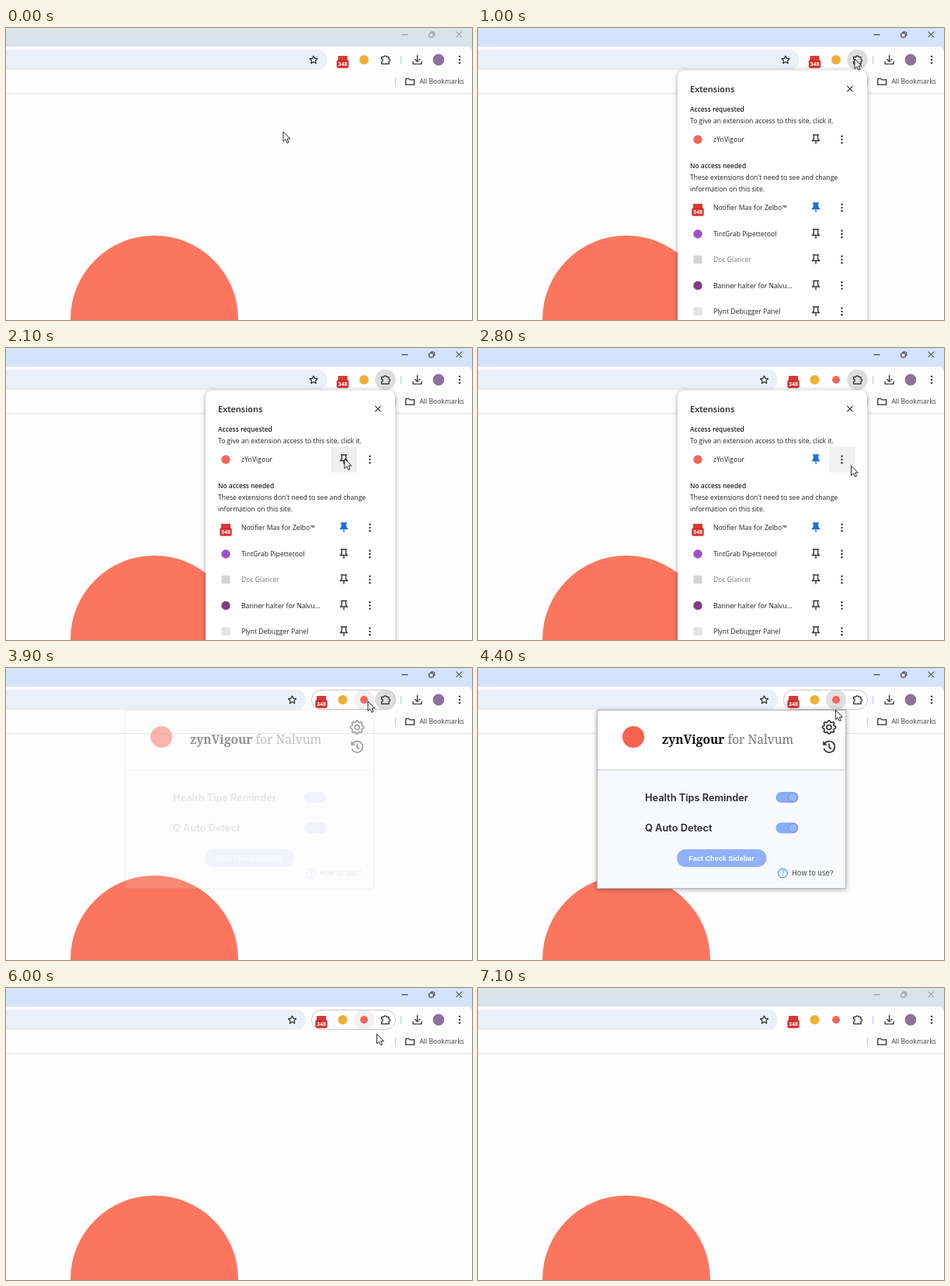
Write an HTML page that moves like this. It is 600 px wide and 377 px high and loops after 7200 ms.

```html
<!DOCTYPE html>
<html lang="en">
<head>
<meta charset="utf-8">
<title>Browser extension walkthrough</title>
<style>
  html, body { margin: 0; height: 100%; overflow: hidden; background: #fefdfd; }
  svg { display: block; width: 100vw; height: 100vh; }
  text { font: 8.65px "Open Sans", "Noto Sans", sans-serif; fill: #1f1f1f; }
  .semi { font-size: 8.35px; font-weight: 600; }
  .heading { font-size: 11px; font-weight: 600; }
  .badge { font: bold 7px "Open Sans", sans-serif; fill: #fff; text-anchor: middle; }
  .title { font: 15.5px "Noto Serif", serif; fill: #777; }
  .title tspan { font-weight: 700; fill: #111; }
  .option { font: 600 12.8px Inter, sans-serif; fill: #292929; }
  .button { font: bold 9.1px "Liberation Sans", Arial, sans-serif; fill: #fff; text-anchor: middle; }
  .help { font: 9.2px Inter, sans-serif; fill: #4a4a4a; }
  .line { fill: none; stroke: #2b2b2b; stroke-width: 1.2; }
  .panel { filter: drop-shadow(0 1px 3px #0005); }
</style>
</head>
<body>
<svg viewBox="0 0 600 377">
  <defs>
    <g id="dots" fill="#333"><circle cy="-4.3" r="1.2"/><circle r="1.2"/><circle cy="4.3" r="1.2"/></g>
    <path id="pin" d="M-4-6H4M-2.6-6V-1L-4.4 1.5H4.4L2.6-1V-6M0 1.5V6" stroke-width="1.3"/>
    <path id="cross" d="M-3.7-3.7L3.7 3.7M3.7-3.7L-3.7 3.7"/>
    <g id="mail">
      <rect x="-6" y="-5" width="12" height="12" fill="#d93a35"/>
      <rect x="-7.7" y="0" width="15.4" height="10.7" rx="2.5" fill="#d32f2f"/>
      <text class="badge" y="8.2">348</text>
    </g>
    <g id="toggle">
      <rect x="-14.5" y="-7" width="29" height="14" rx="7" fill="#8cabf9"/>
      <circle cx="7.2" r="5.7" fill="#9ab6fb" stroke="#7592dc"/>
    </g>
  </defs>

  <rect id="titleBar" width="600" height="40"/>
  <path d="M0 24H593Q600 24 600 31V377H0Z" fill="#fefdfd"/>
  <g id="windowButtons" fill="none">
    <path d="M509.5 8.7H517.5"/>
    <rect x="544.8" y="6.6" width="5.4" height="5.4" rx="1"/>
    <path d="M546.6 5H550Q551.8 5 551.8 6.8V10.2"/>
    <use href="#cross" x="583.3" y="8.3"/>
  </g>
  <path d="M0 84.5H600" stroke="#e3e4e7"/>
  <circle cx="191" cy="376" r="108" fill="#fc765f"/>

  <rect id="addressBar" x="-20" y="28" height="26" rx="13" fill="#ebeff8"/>
  <g id="shifted">
    <path class="line" stroke-linejoin="round" d="M396 36L397.5 39.3 401 39.7 398.4 42.1 399.2 45.7 396 43.8 392.8 45.7 393.6 42.1 391 39.7 394.5 39.3Z"/>
    <use href="#mail" x="433.5" y="41"/>
    <circle cx="461" cy="41" r="6" fill="#f0ae35"/>
  </g>
  <circle id="puzzleGlow" cx="488.5" cy="41" r="13.3" fill="#dcdcdc"/>
  <circle id="healthGlow" cx="461" cy="41" r="13"/>
  <circle id="healthIcon" cx="461" cy="41" r="5" fill="#f4655a"/>
  <rect id="pill" x="393.5" y="28.5" width="108" height="25" rx="12.5" fill="none" stroke="#cfc4c6"/>
  <path class="line" stroke-linejoin="round" d="M483.6 37.3H486.8A1.5 1.5 0 0 1 489.8 37.3H493V40.3A1.5 1.5 0 0 1 493 43.3V46.4H483.6V43.4A1.6 1.6 0 0 0 483.6 40.2Z"/>
  <path d="M508.5 36V47M501.5 64V75" stroke="#c3d6f6" stroke-width="1.5"/>
  <path class="line" stroke-width="1.5" d="M529.5 35V43M526 39.8L529.5 43.3 533 39.8M524 43V46.5H535V43"/>
  <circle cx="557" cy="41" r="7.5" fill="#8e7199"/>
  <use href="#dots" x="584" y="41"/>
  <path class="line" stroke-linejoin="round" d="M514.7 65.3H518.5L520 66.8H525.5V73.2H514.7Z"/>
  <text x="532.4" y="72.2" style="fill:#3c3c3c">All Bookmarks</text>

  <g id="menu">
    <rect class="panel" x="257" y="54.5" width="244" height="345" rx="9" fill="#fff"/>
    <text class="heading" x="273" y="83">Extensions</text>
    <use href="#cross" x="479" y="78.5" stroke="#333" stroke-width="1.2"/>
    <text class="semi" x="273" y="108">Access requested</text>
    <text x="273" y="123">To give an extension access to this site, click it.</text>
    <text class="semi" x="273" y="181">No access needed</text>
    <text x="273" y="196">These extensions don't need to see and change</text>
    <text x="273" y="211">information on this site.</text>
    <rect id="rowHover" y="127.5" width="33.5" height="33" fill="#f0f0f0"/>
    <g id="rows"></g>
  </g>

  <g id="popup">
    <g id="popupPanel">
      <rect class="panel" x="153.5" y="54.5" width="320" height="230" fill="#fff" stroke="#b5b9c0"/>
      <rect x="154" y="132" width="319" height="152" fill="#f8faff"/>
      <path d="M154 131.5H473" stroke="#c8cacc"/>
    </g>
    <g id="popupHeader">
      <circle cx="200" cy="89" r="14" fill="#f8604f"/>
      <text class="title" x="237" y="97.5"><tspan>zynVigour</tspan> for Nalvum</text>
      <g class="line" style="stroke-width:1.6">
        <path id="gear" stroke-linejoin="round"/>
        <circle cx="452" cy="76.5" r="3"/>
        <path d="M446 98A7.2 7.2 0 1 1 445.3 104M445 95V99H449M452 97.5V102.5L455 104.5"/>
      </g>
    </g>
    <g id="popupBody">
      <text class="option" x="215" y="171.7">Health Tips Reminder</text>
      <text class="option" x="215" y="211.2">Q Auto Detect</text>
      <use href="#toggle" x="398" y="167"/>
      <use href="#toggle" x="398" y="206.5"/>
      <rect x="256" y="234" width="115.5" height="23" rx="11.5" fill="#91b1ff"/>
      <text class="button" x="313.5" y="248.7">Fact Check Sidebar</text>
      <circle cx="392.5" cy="265" r="5.8" fill="none" stroke="#3f9be8" stroke-width="1.2"/>
      <text class="help" x="392.5" y="268.3" text-anchor="middle" style="fill:#3f9be8">?</text>
      <text class="help" x="404" y="268.3">How to use?</text>
    </g>
  </g>

  <g id="cursor" fill="#fff" stroke="#111" stroke-width=".9" stroke-linejoin="round">
    <path id="arrow" d="M0 0V12.5L2.9 9.8 5 14.3 7 13.4 5 9.1H8.9Z"/>
    <path id="hand" d="M3 1Q4.5-1 6 1V6Q7.5 4.8 8.5 6.4 10 5.8 10.6 7.2 12 7 12 8.6V12L10.5 16.5H4.2L-.5 11Q-1.2 9 .8 9.2L3 11Z"/>
  </g>
</svg>

<script>
const LOOP = 7200, STEP = 100;
const el = Object.fromEntries([...document.querySelectorAll("[id]")].map(e => [e.id, e]));
const set = (e, attrs) => { for (const k in attrs) e.setAttribute(k, attrs[k]); };
const show = (e, visible) => { e.style.display = visible ? "" : "none"; };

const disc = (y, color) => `<circle cx="283" cy="${y}" r="5.7" fill="${color}"/>`;
const square = (y, color) => `<rect x="277.5" y="${y - 5.5}" width="11" height="11" rx="2" fill="${color}"/>`;
const rows = [
  [144, "zYnVigour", disc(144, "#f4655a")],
  [232, "Notifier Max for Zelbo™", '<use href="#mail" x="283" y="232"/>'],
  [266, "TintGrab Pipettetool", disc(266, "#9a55c4")],
  [299, "Doc Glancer", square(299, "#d4d4d4"), "#777"],
  [332.5, "Banner halter for Nalvu...", disc(332.5, "#804080")],
  [366, "Plynt Debugger Panel", square(366, "#e3e3e3")],
];
el.rows.innerHTML = rows.map(([y, name, icon, color = "#1f1f1f"], i) => `${icon}
  <text x="303" y="${y + 3}" style="fill:${color}">${name}</text>
  <use class="pin" href="#pin" x="435" y="${y}" fill="${i == 1 ? "#1a6fe0" : "none"}" stroke="${i == 1 ? "#1a6fe0" : "#333"}"/>
  <use href="#dots" x="468.5" y="${y}"/>`).join("");
const healthPin = document.querySelector(".pin");

const gearPoints = [];
for (let i = 0; i < 32; i++) {
  const radius = i % 4 < 2 ? 8.6 : 6.7, angle = (i - .5) * Math.PI / 16;
  gearPoints.push(`${452 + radius * Math.cos(angle)} ${76.5 + radius * Math.sin(angle)}`);
}
set(el.gear, { d: `M${gearPoints.join("L")}Z` });

// time, x, y of the cursor tip
const path = [
  [0, 357, 134], [100, 357, 134], [900, 485, 40], [1500, 485, 40], [2100, 436, 143],
  [2400, 436, 143], [2800, 480.5, 152], [2900, 480.5, 152], [3500, 466, 43], [4200, 466, 43],
  [4700, 450, 75], [4900, 449, 76], [5200, 437, 95], [5400, 437, 95],
  [5800, 477.5, 59.5], [6300, 477.5, 59.5], [7000, 600, 230], [7200, 600, 230],
];
function cursorAt(t) {
  const i = path.findIndex(p => p[0] > t);
  const [t0, x0, y0] = path[i - 1], [t1, x1, y1] = path[i];
  const u = (t - t0) / (t1 - t0), ease = u * u * (3 - 2 * u);
  return [x0 + (x1 - x0) * ease, y0 + (y1 - y0) * ease];
}

function draw(t) {
  const during = (from, to) => t >= from && t < to;
  const active = during(900, 7100), menu = during(1000, 3900), pinned = t >= 2200;
  const popup = during(3900, 5800), fading = t < 4000;
  const [x, y] = cursorAt(t);

  set(el.titleBar, { fill: active ? "#d3e3fd" : "#dae2ea" });
  set(el.windowButtons, { stroke: active ? "#222" : "#858a90" });
  set(el.addressBar, { width: pinned ? 406 : 434 });
  set(el.shifted, { transform: `translate(${pinned ? -27.5 : 0} 0)` });
  show(el.healthIcon, pinned);
  show(el.puzzleGlow, during(1000, 4000));
  show(el.healthGlow, during(3500, 6300));
  set(el.healthGlow, { fill: popup && !fading ? "#dfdfdf" : "#f0f0f0" });
  show(el.pill, during(3900, 6600));

  show(el.menu, menu);
  const overRow = y > 128 && y < 161 && x > 418 && x < 485;
  show(el.rowHover, overRow);
  set(el.rowHover, { x: x < 452 ? 418.5 : 452 });
  set(healthPin, pinned ? { fill: "#1a6fe0", stroke: "#1a6fe0" } : { fill: "none", stroke: "#333" });

  show(el.popup, popup);
  set(el.popupPanel, { opacity: fading ? .14 : 1 });
  set(el.popupHeader, { opacity: fading ? .45 : 1 });
  set(el.popupBody, { opacity: fading ? .1 : 1 });

  const pointing = popup && y > 66 && x < 462;
  show(el.cursor, t < 7100);
  show(el.hand, pointing);
  show(el.arrow, !pointing);
  set(el.cursor, { transform: `translate(${x - (pointing ? 2 : 0)} ${y})` });
}

function tick(now) {
  draw(Math.floor(now % LOOP / STEP) * STEP);
  requestAnimationFrame(tick);
}
draw(0);
requestAnimationFrame(tick);
</script>
</body>
</html>
```
